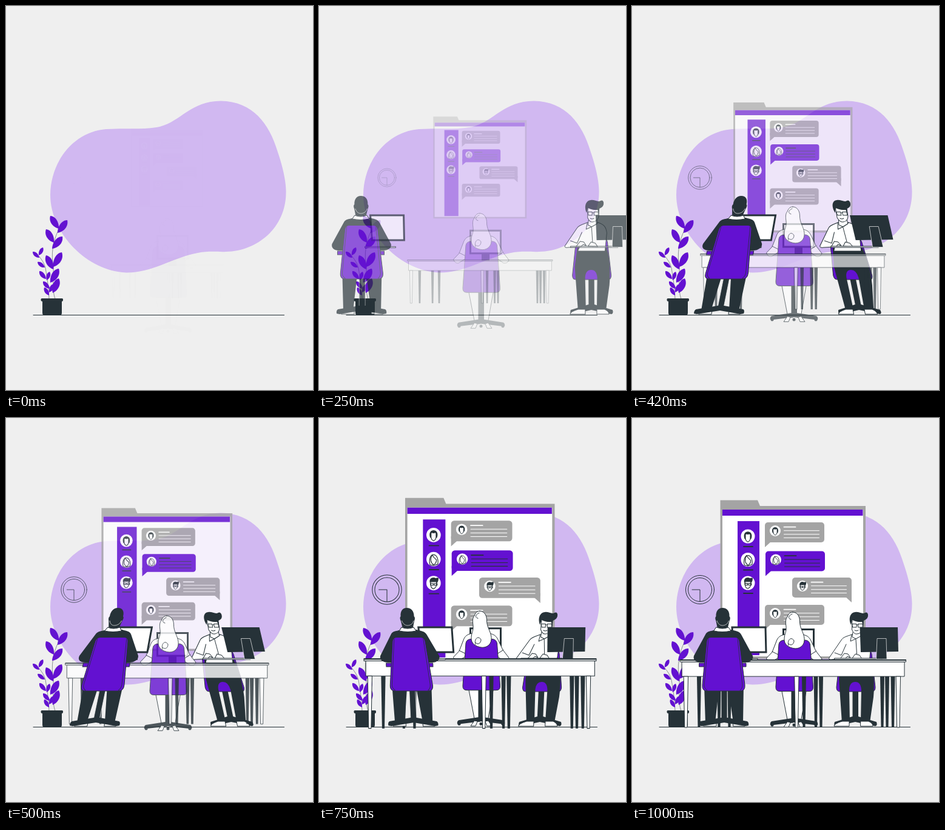
Write an HTML page that moves like this. It is 506 px wide and 633 px high and loops after 1040 ms.

```html
<!DOCTYPE html>
<html lang="en">
<head>
<meta charset="utf-8">
<title>Team at work</title>
<style>
  html, body { margin: 0; width: 100%; height: 100%; overflow: hidden; background: #efefef; }
  svg { display: block; width: 100vw; height: 100vh; }
  .ink { fill: #263238; }
  .violet { fill: #6311d1; }
  .grey { fill: #a4a4a4; }
  .paper { fill: #fff; }
  .edge { stroke: #263238; stroke-width: 1; stroke-linejoin: round; stroke-linecap: round; }
  .line { fill: none; stroke: #263238; stroke-width: 1; stroke-linejoin: round; stroke-linecap: round; }
  .bezel { fill: #fff; stroke: #263238; stroke-width: 3; }
  .pale { fill: none; stroke: #efefef; stroke-width: .7; }
</style>
</head>
<body>
<svg viewBox="0 0 506 633" preserveAspectRatio="none">
  <path fill="#d1b8f1" d="M165 203C195 201 222 204 248 200C286 194 302 157 354 156.500C407 157 434 195 447 238C456 264 462 290 461.500 308C461 366 414 404 363 405C350 406 338 403 316 407C276 414 242 440 198 439.500C135 437 73 376 73 311C74 254 113 207 165 203Z"/>
  <path class="line" d="M45 509.500H458.500"/>

  <g id="clock">
    <circle class="line" cx="112" cy="283" r="23.500"/>
    <circle class="line" cx="112" cy="283" r="19.500"/>
    <path class="line" d="M99 283H112V302"/>
  </g>

  <g id="board">
    <path class="grey" d="M145.500 135.500H207L211 145H385V397H145.500Z"/>
    <path class="paper" d="M149 151H381V393H149Z"/>
    <path class="violet" d="M149 151H380.500V161H149ZM174 170H210V391H174Z"/>
  </g>

  <g id="plant">
    <path class="line" stroke-opacity=".5" d="M81 483C75 466 79 445 78 430C74 410 77 388 87 368M71 483C70 462 68 450 65 432C63 424 59 418 54 412"/>
    <path class="ink" d="M59 482H92.500Q94 482 94 483.500V485Q94 487 92 487V506Q92 509.500 89 509.500H63Q60 509.500 60 506V487Q57.500 487 57.500 485V483.500Q57.500 482 59 482Z"/>
  </g>

  <g id="screen">
    <path class="ink" d="M268 387H281V398H268Z"/>
    <path class="bezel" d="M249.500 348.500H299.500V386H249.500Z"/>
  </g>

  <g id="rightMan">
    <path class="ink" d="M363.500 450H373V492L403 501Q405 507 401 508L368 501L336 508Q332 507 334 501L363.500 492Z"/>
    <path class="violet edge" d="M350 383H388Q394 383 395 389L401 444Q401 451 395 451H343Q337 451 337 444L343 389Q344 383 350 383Z"/>
    <path class="ink" d="M345 399H394C399 415 400 440 398 460L392 502H377L378 448Q377 435 368 435Q359 435 358 447L359 502H346L341 430Z"/>
    <path class="paper edge" d="M346 500H358V508H333Q333 504 346 500ZM377 500H390Q397 503 397 508H377Z"/>
    <path class="paper edge" d="M362 357C354 360 348 361 345 366L324.500 396Q325 399 330 398L349 397L346 404H391L394 374C393 364 389 360 380 357Z"/>
    <path class="line" d="M353 373L345 391L334 387M362 357L360 368L369 364L380 357M369 365L371 397"/>
    <path class="paper edge" d="M363 332L362.500 349Q366 357 371 356Q379 355 381 346L381 331ZM364 353L363 361L369 364L378 359V352"/>
    <path class="ink" d="M361 341C357 333 358 321 368 320C374 319 380 324 384 321Q388 319 389 324Q390 331 382 334L381 343L379 336C373 337 368 335 363 333Z"/>
    <path class="line" d="M363 339.500H370V345H364ZM373 339.500H380V345H373ZM370 341H373M367 350Q370 352 373 350"/>
    <path class="paper edge" d="M343 397L350 388L356 389L360 395L355 393L351 397ZM363 396L368 389L375 391L379 397Z"/>
  </g>

  <g id="rightScreen">
    <path class="paper edge" d="M334 396H412V398H334Z"/>
    <path class="ink" d="M375.500 345H438L439 385L377 386Z"/>
    <path class="ink" stroke="#efefef" stroke-width=".7" d="M404 363.500H419L420 397.500H402.500Z"/>
  </g>

  <g id="woman">
    <path class="paper edge" d="M246 445L257 502H265L266 445ZM268 445L272 502H278L288 445Z"/>
    <path class="ink" d="M262.500 449H272V495L304 500Q307 502 306 506L301 506L267 502L233 506L228 506Q227 502 230 500L262.500 495Z"/>
    <circle class="ink" cx="231" cy="506" r="2.500"/><circle class="ink" cx="303" cy="506" r="2.500"/><circle class="ink" cx="267" cy="506" r="2.500"/>
    <path class="paper edge" d="M256 501L250 509.500H258L261 502ZM274 502L277 509.500H285L279 501Z"/>
    <path class="paper edge" d="M252 357C244 358 240 362 238 368L231 386L221.500 396Q224 403 230 402L246 392L290 392L304 402Q311 403 313 397L303 384L295 367C292 361 288 358 281 357Z"/>
    <path class="line" d="M231 385L243 391L246 377M304 384L293 391L290 377"/>
    <path class="violet edge" d="M252 366H284Q292 366 293.500 373L298.500 443Q299 450.500 292 450.500H244Q236.500 450.500 237 443L242 373Q243 366 252 366Z"/>
    <path class="paper edge" d="M265 320C271 320 276 325 276.500 334C276 346 283 353 284 363C285 374 278 380 269 380C259 379 250 374 251 363C251 357 255 352 254 344C253 336 253 331 256 328C258 322 261 320 265 320Z"/>
    <path class="line" d="M264 323C257 326 257 331 262 332M258 375C255 367 262 359 267 367C267 374 261 376 258 372"/>
  </g>

  <g id="desk">
    <path class="paper edge" d="M82.500 402H449V426H82.500Z"/>
    <path class="paper edge" d="M79.500 398.500H451.500V402H79.500Z"/>
    <path class="line" style="stroke-width:2" d="M80 399H451"/>
  </g>

  <g id="leftScreen">
    <path class="bezel" d="M165 345H220L221 386H168Z"/>
    <path class="paper edge" d="M156 396.500H207V398.500H156Z"/>
  </g>

  <g id="leftMan">
    <path class="paper edge" d="M121 500H139V508H118ZM167 500H183L186 508H167Z"/>
    <path class="ink" d="M119 440H144L137 503H121ZM158 440H184L183 503H167Z"/>
    <path class="ink" d="M147 448H157V494L190 500Q193 502 192 507L187 508L152 502L115 508L110 507Q109 502 112 500L147 494Z"/>
    <path class="pale" d="M147 450V494M157 450V494"/>
    <path class="ink" d="M134 350C128 352 124 351 121 357L102 392C100 399 106 403 114 403H187C195 403 201 398 199 392L180 357C177 351 169 351 164 349Z"/>
    <path class="paper edge" d="M139 345Q149 349 159 345L163 351Q149 354 135 351Z"/>
    <path class="ink" d="M149 313C157 313 161 319 160.500 327Q163 329 160.500 335L158 345Q149 349 140.500 345L138.500 335Q136 329 138.500 327C138 319 142 313 149 313Z"/>
    <path class="pale" d="M140 334C142 341 147 342 149 342C153 342 158 340 159.500 334"/>
    <path class="violet edge" d="M111 404H188V410H111Z"/>
    <path class="violet edge" d="M130 361.500H170Q176 361.500 177 368L186 440Q187 450 178 450H124Q115 450 116 440L123 368Q124 361.500 130 361.500Z"/>
    <path class="line" stroke-opacity=".8" d="M126 364L119 440Q119 446 124 449M174 364L182 440Q182 446 178 449"/>
  </g>
</svg>
<script>
const INK = '#263238', WHITE = '#fff';
const $ = id => document.getElementById(id);
const add = (id, markup) => $(id).insertAdjacentHTML('beforeend', markup);

// Leaves: base x, y, tip x, y
function leaf([x, y, tx, ty]) {
  const dx = tx - x, dy = ty - y, side = tx < x ? 1 : -1;
  const at = (a, b) => `${x + dx * a - dy * b * side} ${y + dy * a + dx * b * side}`;
  return `<path class="violet" d="M${x} ${y}C${at(.25, .2)} ${at(.75, .32)} ${tx} ${ty}C${at(.75, -.3)} ${at(.3, -.28)} ${x} ${y}Z"/>`;
}
add('plant', [
  [87, 367, 73, 346], [85, 374, 101, 353], [79, 390, 66, 368], [76, 400, 93, 380],
  [78, 430, 92, 406], [78, 434, 66, 411], [73, 456, 87, 433], [77, 473, 87, 449],
  [55, 415, 44, 405], [54, 411, 61, 398], [64, 431, 52, 422], [66, 450, 55, 437],
  [67, 452, 72, 438], [72, 466, 61, 454], [71, 477, 63, 464], [71, 472, 79, 458]
].map(leaf).join(''));

const faces = [
  `<path fill="${INK}" d="M-5 3C-9 -10 9 -10 5 3L3 5H-3Z"/><path class="paper edge" d="M-3.500 -3Q-2 -4 0 -3Q2 -4 3.500 -3V3Q3 7 0 8Q-3 7 -3.500 3Z"/>`,
  `<path class="paper edge" d="M-5 8C-9 -10 8 -11 6 7Q3 8 0 9Z"/><path class="line" d="M-2 -6C-5 0 -4 5 0 8Q4 6 4 1Q0 -2 -2 -6"/>`,
  `<path class="paper edge" d="M-4 -2V3Q-3 8 0 8Q3 7 4 3V-2Z"/><path fill="${INK}" d="M-5 0C-7 -7 -1 -9 3 -7Q6 -8 7 -7Q7 -3 5 0L4 -2H-4Z"/><path class="line" d="M-4.500 .5H-.5V3H-4ZM1 .5H5V3H1Z"/>`
];
const avatar = (x, y, r, kind) =>
  `<g transform="translate(${x} ${y}) scale(${r / 10})"><circle r="10" fill="#fff"/>${faces[kind]}</g>`;
const rule = (x, y, w, color, weight) =>
  `<path d="M${x} ${y}h${w}" stroke="${color}" stroke-width="${weight}" stroke-linecap="round"/>`;

function bubble(x, y, kind, color, text, tailRight) {
  const tail = tailRight ? `M${x + 98} ${y + 25}v16l-10 -9z` : `M${x} ${y + 25}v16l10 -9z`;
  return `<rect class="${color}" x="${x}" y="${y}" width="98" height="33" rx="5"/><path class="${color}" d="${tail}"/>`
    + avatar(x + 17, y + 14, 9, kind) + rule(x + 31.5, y + 7.7, 19, text, 1.8)
    + [13.7, 19.7, 25.5].map(dy => rule(x + 31.5, y + dy, 58, text, 1)).join('');
}
add('board', [195, 233.5, 272].map((y, i) =>
  avatar(191, y, 11.5, i) + rule(184, y + 17, 15, INK, 1.8)).join('')
  + bubble(219, 172, 0, 'grey', WHITE)
  + bubble(220, 219.5, 1, 'violet', INK)
  + bubble(264, 263, 2, 'grey', WHITE, true)
  + bubble(219, 308, 0, 'grey', WHITE));

const leg = (x, style) => `<path class="${style}" d="M${x} 426h7l-1.500 84h-4z"/>`;
add('desk', [107, 140, 157, 280, 299.5, 308, 409, 417, 426.5].map(x => leg(x, 'ink')).join('')
  + [85.5, 268, 435.5].map(x => leg(x, 'paper edge')).join(''));

// cubic-bezier(.36, -.01, .5, 1.38)
const bezier = (a, b, u) => 3 * (1 - u) ** 2 * u * a + 3 * (1 - u) * u * u * b + u ** 3;
function ease(x) {
  if (x <= 0) return 0;
  if (x >= 1) return 1;
  let low = 0, high = 1;
  for (let i = 0; i < 30; i++) {
    const mid = (low + high) / 2;
    if (bezier(.36, .5, mid) < x) low = mid; else high = mid;
  }
  return bezier(-.01, 1.38, low);
}

function pose(id, transform, opacity) {
  $(id).setAttribute('transform', transform);
  $(id).setAttribute('opacity', Math.max(0, Math.min(1, opacity)));
}
function zoom(id, x, y, p) {
  pose(id, `translate(${x} ${y}) scale(${.5 + p / 2}) translate(${-x} ${-y})`, p);
}

const tan = deg => Math.tan(deg * Math.PI / 180);
const leans = [20, -10, 2, 0].map(tan);
const stops = [0, .6, .8, 1];
function rush(id, side, centerY, t) {
  const i = t < .6 ? 0 : t < .8 ? 1 : 2;
  const p = ease((t - stops[i]) / (stops[i + 1] - stops[i]));
  const lean = side * (leans[i] + (leans[i + 1] - leans[i]) * p);
  const shift = i ? 0 : -253 * side * (1 - p);
  pose(id, `matrix(1 0 ${lean} 1 ${shift - lean * centerY} 0)`, i ? 1 : p);
}

const LOOP = 1040, FPS = 24, LEAD = .031;
function draw(ms) {
  const t = Math.min(1, Math.floor((ms + 5) * FPS / 1000) / FPS + LEAD);
  const p = ease(t);
  zoom('clock', 112, 283, p);
  zoom('board', 265.3, 266.2, p);
  zoom('desk', 265.5, 454, p);
  for (const id of ['screen', 'woman']) pose(id, `translate(0 ${30.4 * (1 - p)})`, p);
  rush('leftMan', 1, 411, t);
  rush('leftScreen', 1, 371, t);
  rush('rightMan', -1, 414, t);
  rush('rightScreen', -1, 371, t);
}

const start = performance.now();
function tick() {
  draw((performance.now() - start) % LOOP);
  requestAnimationFrame(tick);
}
tick();
</script>
</body>
</html>
```
